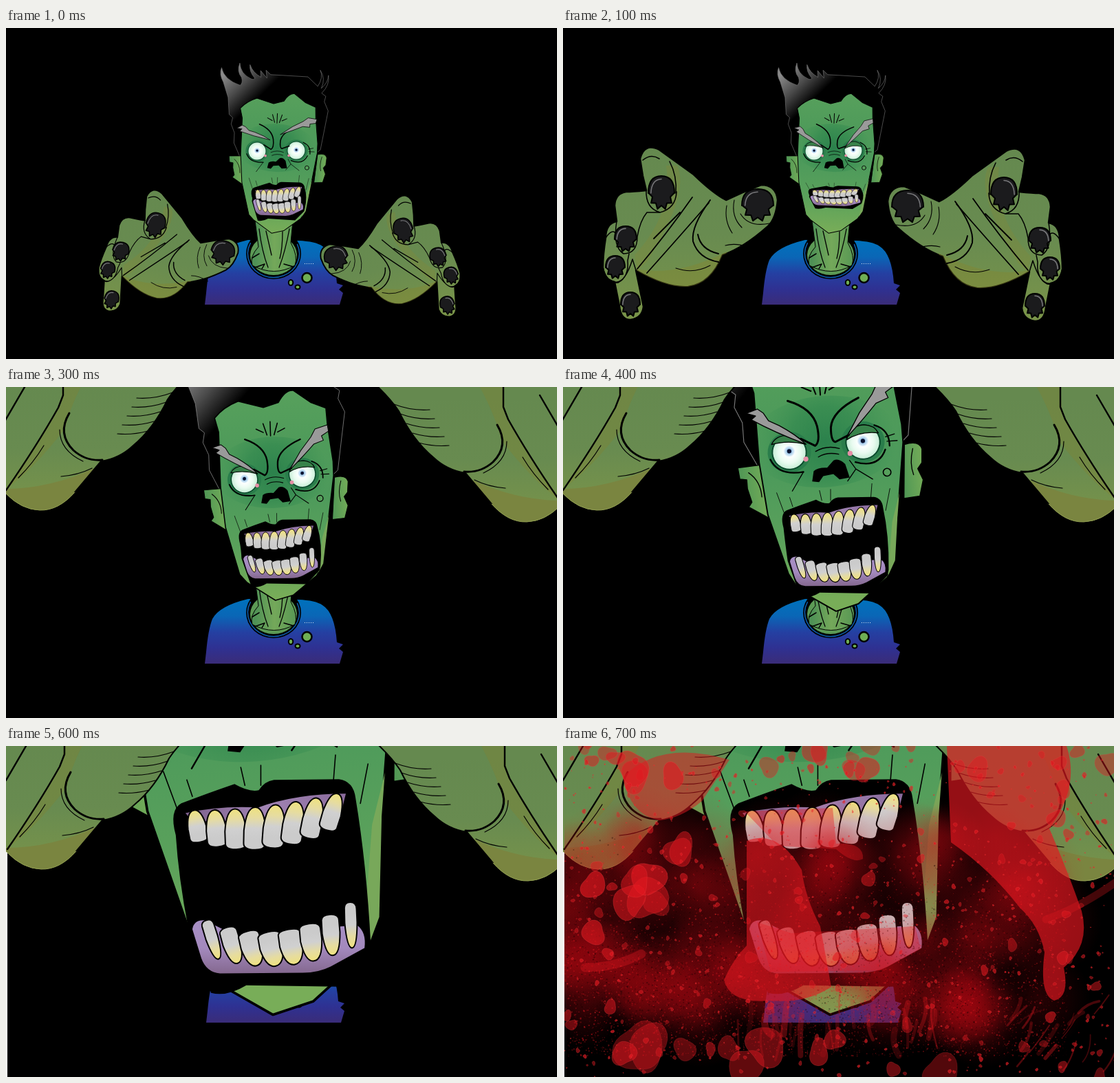
Animation, 801 px wide and 481 px high, one loop 950 ms. Source, as an HTML page with a canvas:

```html
<!DOCTYPE html>
<html lang="en">
<head>
<meta charset="utf-8">
<title>Zombie</title>
<style>
html, body { margin: 0; width: 100%; height: 100%; overflow: hidden; background: #000; }
canvas { display: block; }
</style>
</head>
<body>
<canvas id="stage" width="801" height="481"></canvas>
<script>
const ctx = document.getElementById('stage').getContext('2d');
const STEP = 100, LOOP = 950, LAST = 7;

// ---------- helpers ----------
const fill = (d, color) => { ctx.fillStyle = color; ctx.fill(new Path2D(d)); };
const line = (d, w = 1, color = '#000') => {
  ctx.lineWidth = w;
  ctx.strokeStyle = color;
  ctx.stroke(new Path2D(d));
};
const shape = (d, color, w = 1, edge = '#000') => { fill(d, color); line(d, w, edge); };
const oval = (x, y, rx, ry, color, w = 0) => {
  ctx.beginPath();
  ctx.ellipse(x, y, rx, ry, 0, 0, 7);
  ctx.fillStyle = color;
  ctx.fill();
  ctx.lineWidth = w;
  ctx.strokeStyle = '#000';
  if (w) ctx.stroke();
};
const stops = (g, colors) => {
  colors.forEach((c, i) => g.addColorStop(i / (colors.length - 1), c));
  return g;
};
const down = (y0, y1, ...colors) => stops(ctx.createLinearGradient(0, y0, 0, y1), colors);
const across = (x0, x1, ...colors) => stops(ctx.createLinearGradient(x0, 0, x1, 0), colors);
const radial = (x, y, r, ...colors) => stops(ctx.createRadialGradient(x, y, 0, x, y, r), colors);
const lerp = (a, b, t) => a + (b - a) * t;

// Puts the point (ox, oy) of a drawing at (x, y), turned and scaled around it.
function place(x, y, zoom, tilt, ox, oy, draw) {
  ctx.save();
  ctx.translate(x, y);
  ctx.rotate(tilt);
  ctx.scale(zoom, zoom);
  ctx.translate(-ox, -oy);
  draw();
  ctx.restore();
}

// ---------- poses: x and y locate the left eye, drop opens the jaw ----------
const EYE = [361, 167];
const snarl = { x: 365, y: 179, zoom: .875, tilt: .044, drop: 0, calm: 1, squash: 1 };
const clench = { ...snarl, calm: 0, squash: .6 };
const lean = { x: 361, y: 167, zoom: 1, tilt: 0, drop: 0, calm: 0, squash: 1 };
const lunge = { ...lean, x: 329, y: 95, zoom: 1.66, tilt: -.078, drop: .57 };
const gape = { ...lunge, x: 262, y: -69, zoom: 3, drop: 1 };
const between = (a, b) => Object.fromEntries(Object.keys(a).map(k => [k, lerp(a[k], b[k], .45)]));
const poses = [snarl, clench, lean, between(lean, lunge), lunge, between(lunge, gape), gape, gape];
const shake = n => n === 2 ? [-2, -1] : n >= 6 ? [2, 0] : [0, 0];

// ---------- body ----------
function body() {
  fill('M289 402L291 385Q294 352 300 337Q310 318 352 308L425 309Q450 310 460 317Q478 328 481 371L490 374L484 380L490 385L485 402Z',
    down(310, 402, '#0071bc', '#0a66b6', '#2440a2', '#2f3192', '#3a2c78'));
  oval(389, 328, 40, 37, '#000');
  ctx.lineWidth = 1.6;
  ctx.strokeStyle = '#0d5aa8';
  ctx.beginPath();
  ctx.ellipse(389, 328, 37.5, 34.5, 0, -.4, 3.6);
  ctx.stroke();
  fill('M345 280H434V306H345Z', '#000');
  oval(389, 330, 34, 29, '#5c9a55');
  shape('M362 280L367 318Q354 332 358 345Q390 362 420 345Q425 332 414 312L418 270Z',
    across(362, 418, '#4f9156', '#74a85a', '#5c9a55'), 1);
  line('M368 292Q372 325 381 348M378 295L386 330M412 292Q406 325 397 348M402 296Q402 320 398 335', 1.3);
  line('M358 334L368 328M362 348L376 343L372 350M418 347L404 343', 1.5);
  oval(437.5, 363, 7, 7, '#6fae54', 2.5);
  oval(414, 370, 3.2, 4, '#6fae54', 2);
  oval(424, 376.5, 3.5, 3, '#6fae54', 2);
  ctx.lineCap = 'butt';
  ctx.setLineDash([1, 2]);
  line('M434 342.5H448', 1, '#dde8f4');
  ctx.setLineDash([]);
  ctx.lineCap = 'round';
}

// ---------- head ----------
function eye(x, y, lid) {
  oval(x, y, 19, 18, '#2a7d4b');
  oval(x, y, 15.5, 15.5, '#0b4a2c');
  oval(x, y, 14.3, 14.3, radial(x, y, 14.3, '#fff', '#fbfffd', '#e9fbf0', '#c9eed8'));
  oval(x, y - 1, 5, 5, radial(x, y - 1, 5, '#5b8fd0', '#a8cdea', '#f4fcff'));
  oval(x, y - 1, 1.9, 1.9, '#0b1330');
  if (lid) shape(lid, '#38824a', .8);
}

function hair() {
  const g = stops(ctx.createLinearGradient(302, 42, 350, 88), ['#8a8a8a', '#4a4a4a', '#000']);
  shape('M334 180L322 155V138L316 124L318 113L312 108L309 80L300 55Q292 42 296 31Q301 51 328 59Q333 55 330 46Q321 36 326 22Q328 40 345 47Q350 50 352 46Q342 36 343 24Q348 37 362 44L361 33L372 45L370 32L378 39L440 40L457 55Q466 40 460 28Q470 42 463 58Q474 48 474 36Q477 52 464 66L471 71L469 80L476 95L466 160L455 170Z',
    g, .7, '#777');
}

function face(chin) {
  const d = `M330 97Q340 85 357 79L385 87L402 82Q410 68 419 69L438 83L455 90L456 108L461 150V166L451 231L446 ${263 + chin * .8}L438 ${276 + chin}L411 ${297 + chin}L391 ${302 + chin}L360 ${281 + chin}L352 273L338 220L334 174V113Z`;
  shape(d, down(70, 300, '#57a05c', '#4f9b5a', '#4d9a5b', '#5aa15b', '#78ad58'), 1.2);
  ctx.save();
  ctx.clip(new Path2D(d));
  oval(393, 160, 66, 40, radial(393, 160, 62, 'rgba(20,112,66,.6)', 'rgba(28,122,70,.4)', 'rgba(50,140,80,0)'));
  fill('M461 190L451 232L446 290L436 300L446 235Z', '#78a85a');
  ctx.restore();
}

function head({ drop, calm, squash }) {
  hair();
  const skin = ['#4f9655', '#74ac58'];
  shape('M336 176L315 177L316 187L322 188V196L325 208L322 212L339 223Z', across(315, 340, ...skin), .8);
  shape('M462 168Q475 165 477 173L476 185L472 190L476 200L472 214L458 215Z', across(458, 477, ...skin), .8);
  line('M324 182Q334 190 334 204M469 172Q465 185 468 195', .8);
  face(21 * drop * drop);

  eye(361, 167, !calm && 'M346 159Q350 151 362 152L376 161Q360 156 346 159Z');
  eye(426, 163, !calm && 'M412 160Q415 148 428 148Q437 149 440 156Q424 153 412 160Z');
  oval(375, 174, 2.2, 2.2, '#e58fa6');
  oval(414, 172, 2.2, 2.2, '#e58fa6');

  line('M363 122Q384 130 387 146Q389 160 384 163L372 156M425 124Q401 134 399 148Q398 160 402 161L414 156', 1.8);
  for (let i = -2; i <= 2; i++) line(`M${392 + i * 4} ${119 - i * i}L${392 + i * 8} ${103 + i * i * 2}`, 1.2);
  line('M344 172Q350 187 372 185M418 180Q438 187 445 171M437 149Q450 154 449 168', 1.4);
  line('M384 168Q394 163 405 167M386 173Q394 169 404 172M454 158L446 160M456 164L447 164M372 185L361 201M413 178L418 186L410 196M418 186L432 196', .8);
  fill('M379 194L381 185Q385 182 393 183L399 177Q404 175 409 181L412 193L403 194L398 189L389 190L385 195Z', '#000');
  oval(445, 191, 3.4, 3.4, '#57a05c', 1);

  place(327, 132, 1, calm * -.26, 327, 132, () =>
    shape('M326 130L336 127L341 131L345 138L354 143Q368 152 376 161Q350 149 330 136L334 133Z', '#9a9a9a', .8));
  place(455, 114, 1, calm * .4, 455, 114, () =>
    shape('M456 109L442 113L437 122L425 137L412 158Q428 143 440 130L451 126L449 121L457 116Z', '#9a9a9a', .8));

  const open = Math.min(1, drop * 1.75);
  place(361 - 4 * open, 232 - 10 * open, .335, .078 * open, 0, 0, () => {
    ctx.scale(1, squash);
    ctx.translate(-262, -95);
    mouth(112 * (drop - 1));
  });
}

// ---------- mouth ----------
function tooth(x0, y0, x1, y1, w) {
  const len = Math.hypot(x1 - x0, y1 - y0), h = w / 2;
  place(x0, y0, 1, Math.atan2(y1 - y0, x1 - x0) - Math.PI / 2, 0, 0, () =>
    shape(`M${-h} ${len * .55}Q${-h * .8} 0 0 0Q${h * .8} 0 ${h} ${len * .55}L${h * .95} ${len * .88}Q${h * .9} ${len} 0 ${len}Q${-h} ${len} ${-h} ${len * .85}Z`,
      down(0, len, '#efe27e', '#e6dca0', '#d0d0d0', '#cbcbcb', '#cbcbcb'), 2));
}

function teeth(draw) {
  for (let i = 0; i < 8; i++) draw(i / 7, i / 7 * (1 - i / 7));
}

function mouth(bite) {
  const slide = bite * .15, low = (x, y) => `${x + slide} ${y + bite} `;
  line('M262 48L270 72M340 30L346 56M369 27V56M477 12L474 50M524 25L513 82M228 36L248 90', 1.6);
  fill(`M246 128Q236 92 254 82Q290 68 331 54Q352 66 366 63Q374 50 388 48L482 47Q503 50 506 74Q522 ${170 + bite / 2} ${low(528, 285)}L${low(525, 300)}L${low(482, 347)}L${low(348, 345)}Q${low(320, 362)}${low(297, 356)}L${low(264, 262)}Q250 ${190 + bite / 2} 246 128Z`, '#000');
  fill('M260 96Q310 85 365 88Q420 68 492 68L484 100L400 114L340 108L270 108Z', across(260, 490, '#7d608c', '#a184b4', '#8a6b9c'));
  teeth((t, arc) => tooth(
    lerp(272, 480, t), 92 - 24 * t * t,
    lerp(281, 465, t), 138 - 17 * t + 75 * arc, 27 + 20 * arc));
  place(slide, bite, 1, 0, 0, 0, () => {
    fill('M270 264Q272 250 288 251L330 272L400 272L460 262L508 258Q522 268 519 291L470 318Q452 327 430 327L310 328Q290 326 283 306Z',
      down(255, 328, '#a78fc4', '#a389bd', '#84688f'));
    teeth((t, arc) => tooth(
      lerp(308, 501, t), 307 - 16 * t + 70 * arc,
      lerp(290, 498, t), 251 - 26 * t + 115 * arc, 18 + 64 * arc));
  });
}

// ---------- hands ----------
function nail(x, y, rx, ry) {
  const cut = [];
  for (let i = 0; i <= 10; i++) {
    const a = i * Math.PI / 10, k = i % 2 ? .72 : .97;
    cut.push(`L${x + rx * k * Math.cos(a)} ${y + ry * k * Math.sin(a)}`);
  }
  shape(`M${x - rx} ${y}Q${x - rx} ${y - ry} ${x} ${y - ry}Q${x + rx} ${y - ry} ${x + rx} ${y}${cut.join('')}Z`, '#1b1b1d', 2);
  line(`M${x - rx * .8} ${y}Q${x - rx * .75} ${y - ry * .8} ${x} ${y - ry * .82}`, 1.6, '#77777a');
}

const palm = (y0, y1) => down(y0, y1, '#65894f', '#688b50', '#7a9449');

function hand() {
  const d = 'M312 250Q310 228 288 228Q262 238 237 250Q218 240 190 213L140 177Q118 166 112 190L116 215L121 236Q100 238 92 238Q76 240 75 258L78 281Q62 284 62 305Q58 330 58 348Q60 366 75 369L82 404Q84 424 98 424Q115 422 117 405L106 352Q150 378 182 376Q215 372 232 330Q262 320 298 288Q310 276 312 250Z';
  shape(d, palm(175, 424), 2.5);
  ctx.save();
  ctx.clip(new Path2D(d));
  fill('M106 350Q165 362 238 325L230 380H120Z', 'rgba(134,132,46,.4)');
  fill('M166 200Q185 240 122 340L108 352L104 330Q160 270 150 200Z', 'rgba(128,136,56,.35)');
  ctx.restore();
  line('M155 194Q166 215 164 240M121 236Q120 262 141 268Q164 262 165 238M116 192Q128 182 140 190', 1.6);
  line('M78 281Q72 318 88 328Q108 328 108 303Q112 280 122 268L140 268M62 305Q72 290 78 300', 1.5);
  line('M58 348Q64 372 80 370Q96 362 94 338L96 328M75 369Q90 372 101 336L106 352', 1.5);
  line('M188 246Q150 300 108 350M212 254Q172 300 122 356M170 268L132 306', 1.8);
  line('M214 250Q186 288 189 310Q197 335 226 340M196 300Q200 322 226 328', 2);
  line('M238 258Q234 280 246 298M249 250Q244 274 260 290M270 318Q250 312 236 316M164 349Q190 358 214 345M258 270Q270 290 300 284', 1.1);
  nail(143, 240, 19, 25);
  nail(91, 307, 16, 19);
  nail(76, 348, 14, 17);
  nail(98, 402, 14, 18);
  nail(283, 258, 23, 24);
}

function nearHand() {
  const heel = 'L100 153Q76 180 49 179Q22 178 0 155L-12 145Z';
  fill('M-12 -40H290Q250 -5 235 18Q215 60 185 85Q165 104 138 108' + heel, palm(0, 179));
  fill('M-12 148Q60 150 128 118' + heel, '#7a8540');
  fill('M85 -40H130Q95 20 86 60Q40 120 0 148Q50 80 80 25Z', 'rgba(128,128,46,.35)');
  line('M290 -40Q250 -5 235 18Q215 60 185 85Q165 104 138 108L100 153', 2);
  line('M100 153Q76 180 49 179Q22 178 0 155', 1, '#8f9c50');
  line('M83 -40V12L76 30Q45 85 0 150M30 -5L-2 50', 2.4);
  line('M92 38Q74 68 98 92Q116 108 140 106', 3);
  for (let i = 0; i < 5; i++) line(`M${242 - i * 9} ${8 + i * 14}q${-26 + i} ${10 - i} ${-52 + i * 2} ${8 - i}`, 1.2);
  line('M78 62Q78 92 112 108M80 130Q105 128 125 118M55 85Q40 110 18 132', 1.2);
}

function hands(n) {
  const side = () => {
    if (n === 0) place(217, 235, .7485, .262, 125, 173, hand);
    else (n === 1 ? hand : nearHand)();
  };
  const [axis, sink] = n === 0 ? [795, 8] : n === 1 ? [784, 2] : [806, 17];
  side();
  ctx.translate(axis, sink);
  ctx.scale(-1, 1);
  side();
}

// ---------- blood ----------
function blood() {
  let seed = 4217;
  const rnd = () => (seed = seed * 16807 % 2147483647) / 2147483647;
  const span = (a, b) => lerp(a, b, rnd());
  const red = a => `rgba(226,24,32,${a})`;

  const splat = (x, y, r, a) => {
    const p = span(0, 6), q = span(0, 6), tall = span(.8, 1.35);
    ctx.beginPath();
    for (let t = 0; t < 6.28; t += .2) {
      const k = r * (1 + .13 * Math.sin(2 * t + p) + .09 * Math.sin(3 * t + q));
      ctx.lineTo(x + k * Math.cos(t), y + k * tall * Math.sin(t));
    }
    ctx.closePath();
    ctx.fillStyle = red(a);
    ctx.fill();
    ctx.lineWidth = 1;
    ctx.strokeStyle = `rgba(245,70,70,${a * .5})`;
    ctx.stroke();
  };
  const spray = (count, x0, x1, y0, y1, r0, r1, a) => {
    while (count--) splat(span(x0, x1), span(y0, y1), lerp(r0, r1, rnd() ** 2), a * span(.7, 1.2));
  };

  // soft wash, then grain
  for (let i = 0; i < 130; i++) {
    const x = span(-20, 700), y = span(120, 400), r = span(35, 85);
    oval(x, y, r, r, radial(x, y, r, 'rgba(190,8,18,.2)', 'rgba(190,8,18,.1)', 'rgba(190,8,18,0)'));
  }
  for (let i = 0; i < 9000; i++) {
    const s = span(.6, 2.2), y = 120 + 330 * Math.sqrt(rnd());
    ctx.fillStyle = rnd() < .4 ? 'rgba(20,0,2,.4)' : red(span(.1, .5));
    ctx.fillRect(span(0, 730), y, s, s);
  }

  // large smears
  fill('M85 45Q140 -10 240 20L200 80Q170 105 138 108Q95 100 85 45Z', red(.5));
  fill('M556 0H730Q750 60 705 120Q735 190 752 240Q765 290 726 322Q735 365 712 370Q690 362 698 300Q690 260 662 235Q620 180 562 140Z', red(.66));
  fill('M265 138Q310 120 345 180Q350 220 372 262L388 350Q350 375 300 370Q240 375 232 340Q245 310 265 290Z', red(.6));
  fill('M280 256L330 272L510 262L518 295L460 326L300 328Z', red(.35));
  fill('M262 95L390 90L395 142Q436 140 434 164Q420 172 395 150L310 145Z', red(.4));

  spray(9, 35, 195, 115, 275, 17, 28, .55);
  spray(10, 30, 620, 425, 475, 14, 34, .45);
  spray(22, 0, 560, 0, 45, 5, 22, .5);
  spray(14, 560, 790, 0, 180, 4, 16, .5);
  spray(120, 0, 801, 0, 481, 2, 9, .5);
  spray(700, 0, 801, 20, 481, .5, 3, .6);

  // drips and flicks
  for (let i = 0; i < 26; i++) line(`M${span(230, 560)} ${span(360, 415)}q${span(-8, 8)} 20 ${span(-10, 10)} ${span(25, 60)}`, span(2, 10), red(span(.12, .35)));
  for (let i = 0; i < 18; i++) line(`M${span(640, 800)} ${span(360, 475)}q12 -14 ${span(10, 34)} ${span(-45, -15)}`, span(1, 6), red(span(.15, .4)));
  line('M700 252Q750 235 810 192', 11, red(.3));
  line('M30 322Q75 322 112 302', 13, red(.35));
}

// ---------- playback ----------
function draw(n) {
  const pose = poses[n], [dx, dy] = shake(n);
  const shaken = part => place(dx, dy, 1, 0, 0, 0, part);
  ctx.lineCap = ctx.lineJoin = 'round';
  fill('M0 0H801V481H0Z', '#fff');
  shaken(() => {
    fill('M0 0H801V481H0Z', '#000');
    body();
  });
  place(pose.x, pose.y, pose.zoom, pose.tilt, ...EYE, () => head(pose));
  shaken(() => hands(n));
  if (n === LAST) shaken(() => {
    ctx.beginPath();
    ctx.rect(0, 0, 801, 481);
    ctx.clip();
    blood();
  });
}

let shown = -1;
const start = performance.now();
function tick() {
  const t = (performance.now() - start) % LOOP;
  const n = Math.min(LAST, Math.floor(t / STEP));
  if (n !== shown) draw(shown = n);
  requestAnimationFrame(tick);
}
tick();
</script>
</body>
</html>
```
